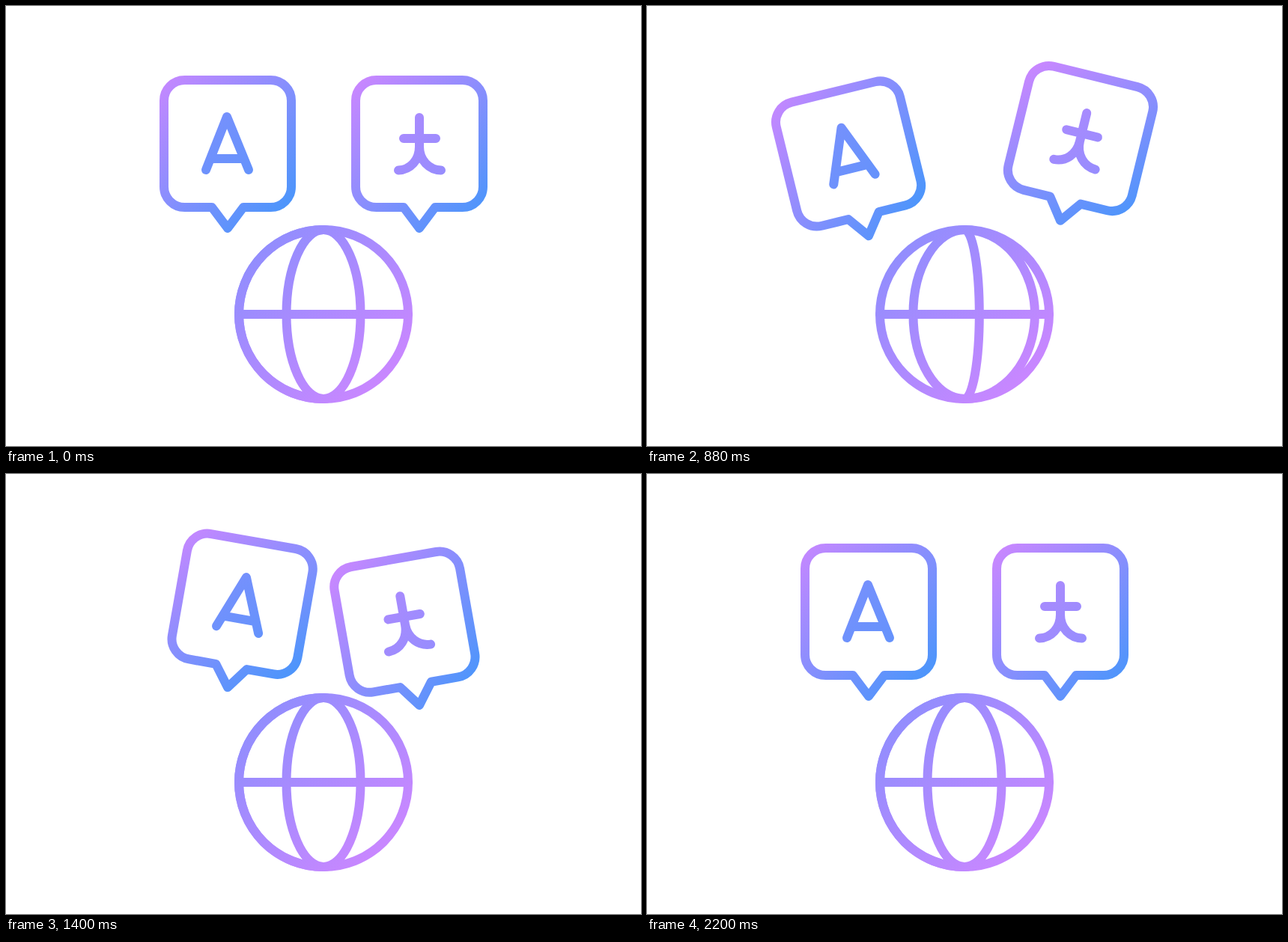
An HTML page that plays this animation: 848x588 px, repeating every 2400 ms.

```html
<!DOCTYPE html>
<html lang="en">
<head>
<meta charset="utf-8">
<title>Translation bubbles and globe</title>
<style>
  html, body { margin: 0; width: 100%; height: 100%; overflow: hidden; background: #fff; }
  svg { display: block; width: 848px; height: 588px; }
  path, circle { fill: none; stroke-width: 12; stroke-linecap: round; stroke-linejoin: round; }
</style>
</head>
<body>
<svg viewBox="0 0 848 588">
  <defs>
    <linearGradient id="base">
      <stop offset="0" stop-color="#c887ff"/>
      <stop offset="1" stop-color="#4e95fb"/>
    </linearGradient>
    <linearGradient id="globeInk" href="#base" gradientUnits="userSpaceOnUse" x1="82" y1="82" x2="-295" y2="-295"/>
    <linearGradient id="leftInk" href="#base" gradientUnits="userSpaceOnUse" x1="-147" y1="-147" x2="22" y2="22"/>
    <linearGradient id="rightInk" href="#base" gradientUnits="userSpaceOnUse" x1="-138" y1="-138" x2="27" y2="27"/>
    <linearGradient id="latinInk" href="#base" gradientUnits="userSpaceOnUse" x1="-375" y1="-375" x2="60" y2="60"/>
    <linearGradient id="hanInk" href="#base" gradientUnits="userSpaceOnUse" x1="-194" y1="-194" x2="241" y2="241"/>
    <path id="bubble" d="M-57.5-198H57.5a27.5 27.5 0 0 1 27.5 27.5V-55.5a27.5 27.5 0 0 1-27.5 27.5H21L0 0L-21-28H-57.5a27.5 27.5 0 0 1-27.5-27.5V-170.5a27.5 27.5 0 0 1 27.5-27.5Z"/>
  </defs>

  <g transform="translate(424 412)" stroke="url(#globeInk)">
    <circle r="113"/>
    <path d="M-113 0H113"/>
    <path class="meridian"/>
    <path class="meridian"/>
    <path class="meridian"/>
  </g>

  <g id="left">
    <use href="#bubble" stroke="url(#leftInk)"/>
    <path stroke="url(#latinInk)" d="M-29-78L-1-149L28-78M-22-93H21"/>
  </g>

  <g id="right">
    <use href="#bubble" stroke="url(#rightInk)"/>
    <path stroke="url(#hanInk)" d="M0-148V-109C0-91-12-78-28-77.5M0-109C0-91 13-78 29-77.5M-21-120H22"/>
  </g>
</svg>
<script>
  const LOOP = 2400, STEP = 20, R = 113;

  // [time in ms, value], eased between neighbours
  const TILT = [[200, 0], [800, 15], [1400, -10], [1800, -4 * -1], [2200, 0]];
  const LIFT = [[200, 0], [700, 25], [1200, -25], [1700, 12], [2200, 0]];

  // The globe turns three times at constant speed
  const SPIN_START = 600, SPIN_END = 1800, TURN = 400;
  const STOPS = [-R, -49.5, 49.5, R];

  const left = document.getElementById('left');
  const right = document.getElementById('right');
  const meridians = document.querySelectorAll('.meridian');

  const mix = (a, b, u) => a + (b - a) * u;
  const ease = u => u * u * (3 - 2 * u);

  function valueAt(keys, t) {
    if (t <= keys[0][0]) return keys[0][1];
    for (let i = 1; i < keys.length; i++) {
      const [t0, a] = keys[i - 1], [t1, b] = keys[i];
      if (t < t1) return mix(a, b, ease((t - t0) / (t1 - t0)));
    }
    return keys[keys.length - 1][1];
  }

  function place(group, x, side, tilt, lift) {
    group.setAttribute('transform',
      `translate(${x} ${297 + side * lift}) rotate(${-side * tilt})`);
  }

  function draw(t) {
    const tilt = valueAt(TILT, t), lift = valueAt(LIFT, t);
    place(left, 296, 1, tilt, lift);
    place(right, 552, -1, tilt, lift);

    const spinning = t > SPIN_START && t < SPIN_END;
    const phase = spinning ? (t - SPIN_START) / TURN % 1 : 0;
    meridians.forEach((path, i) => {
      const x = mix(STOPS[i], STOPS[i + 1], phase);
      path.setAttribute('d',
        `M0 ${-R}A${Math.abs(x)} ${R} 0 0 ${x > 0 ? 1 : 0} 0 ${R}`);
    });
  }

  const start = performance.now();
  function tick() {
    const t = (performance.now() - start) % LOOP;
    draw(Math.floor(t / STEP) * STEP);
    requestAnimationFrame(tick);
  }
  tick();
</script>
</body>
</html>
```
